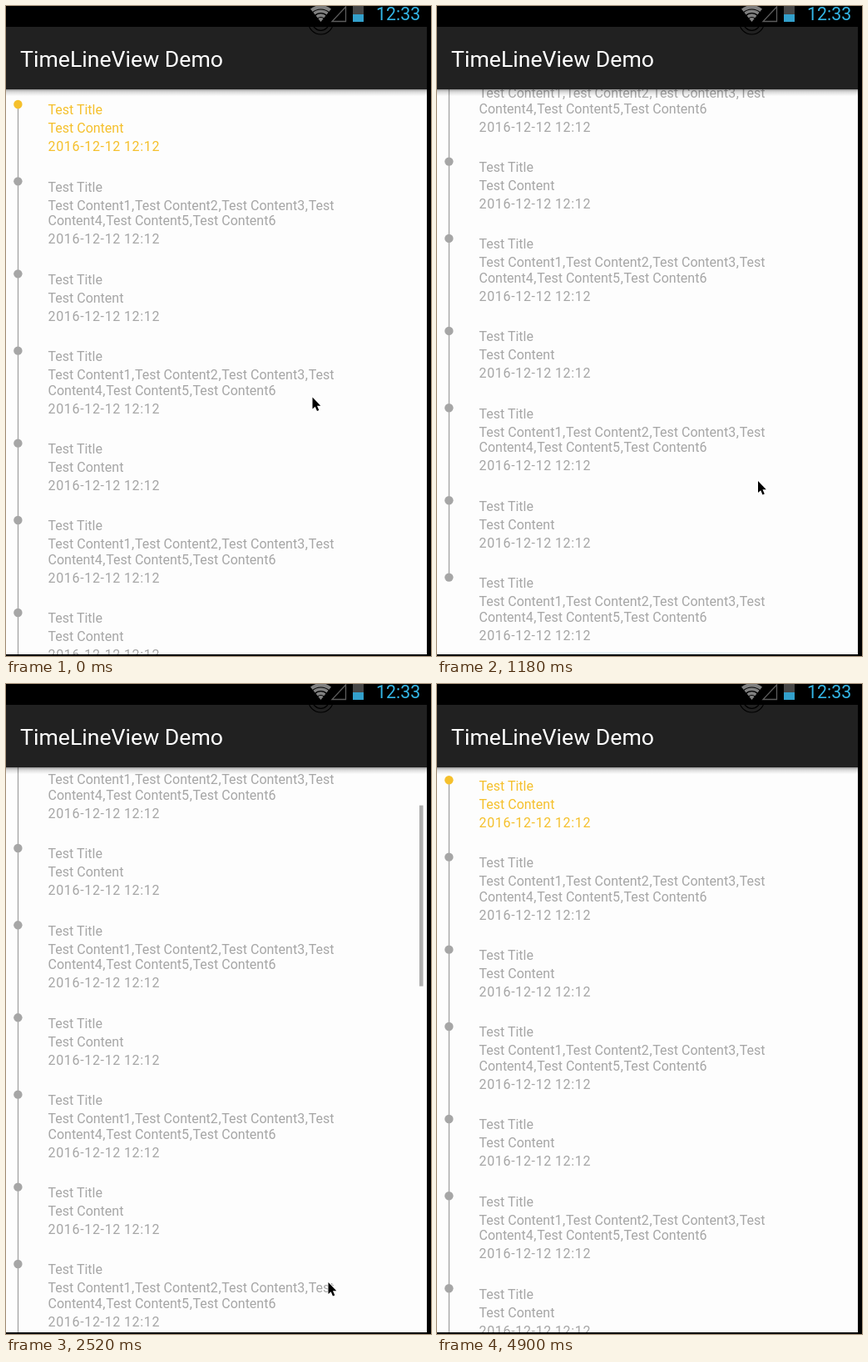
An HTML page that plays this animation: 511 by 780 pixels, repeating every 5350 ms.

```html
<!DOCTYPE html>
<html lang="en">
<head>
<meta charset="utf-8">
<title>TimeLineView Demo</title>
<style>
  html, body { margin: 0; width: 100%; height: 100%; overflow: hidden; background: #000; }
  svg { display: block; width: 511px; height: 780px; font-family: Roboto, "Noto Sans", sans-serif; }
  .item { font-size: 16px; fill: #a6a6a6; }
  .item.first { fill: #f5c02c; }
  .num { letter-spacing: .67px; }
</style>
</head>
<body>
<svg viewBox="0 0 511 780">
  <defs>
    <clipPath id="view"><rect y="99" width="506" height="679"/></clipPath>
    <linearGradient id="shade" x2="0" y2="1">
      <stop offset="0" stop-opacity=".4"/>
      <stop offset=".35" stop-opacity=".15"/>
      <stop offset="1" stop-opacity="0"/>
    </linearGradient>
    <radialGradient id="halo">
      <stop offset="0" stop-color="#33b5e5"/>
      <stop offset=".7" stop-color="#33b5e5" stop-opacity=".7"/>
      <stop offset=".96" stop-color="#33b5e5" stop-opacity=".4"/>
      <stop offset="1" stop-color="#33b5e5" stop-opacity="0"/>
    </radialGradient>
  </defs>

  <rect width="511" height="780"/>
  <rect y="99" width="506" height="679" fill="#fdfdfd"/>
  <g clip-path="url(#view)">
    <g id="list"></g>
    <rect id="bar" x="497" width="4.6" height="217" fill-opacity=".31"/>
    <ellipse id="topGlow" cx="255" cy="99" rx="224" fill="url(#halo)"/>
    <ellipse id="endGlow" cx="249" cy="778" rx="235" fill="url(#halo)"/>
    <ellipse id="endEdge" cx="250" cy="778" rx="160" ry="2.6" fill="#2ba6d6"/>
    <rect y="100" width="506" height="8" fill="url(#shade)"/>
  </g>

  <rect y="25" width="506" height="75" fill="#212121"/>
  <text x="17" y="73" font-size="26.67" fill="#fff">TimeLineView Demo</text>
  <text x="445" y="17" font-size="21.33" fill="#33b5e5">12:33</text>
  <path d="M378.5 19L366 3.5A20 20 0 0 1 391 3.5z" fill="#808080"/>
  <g fill="none" stroke="#000" stroke-width="1.2">
    <circle cx="378.5" cy="19" r="5.5"/>
    <circle cx="378.5" cy="19" r="10.3"/>
    <circle cx="378.5" cy="19" r="15"/>
  </g>
  <path d="M392 18.5H408.5V1z" fill="none" stroke="#5c5c5c" stroke-width="1.3"/>
  <rect x="417" width="13" height="10" fill="#474747"/>
  <rect x="417" y="10" width="13" height="9" fill="#33a0cc"/>

  <path id="cursor" d="M0 0V14L3.2 11.2L5.5 16.4L7.8 15.4L5.5 10.2H9.8z" stroke="#fff" stroke-width="1.6" paint-order="stroke"/>
</svg>

<script>
const LOOP = 5350, STEPS = 36, STEP = LOOP / STEPS;
const ITEMS = 20, SHORT = 92.33, PERIOD = 203.33, FIRST_DOT = 115.3;
const END = 1352, REST = 71.5;

const $ = id => document.getElementById(id);
const set = (id, attrs) => {
  for (const name in attrs) $(id).setAttribute(name, attrs[name]);
};
const ramp = (t, a, b) => Math.min(1, Math.max(0, (t - a) / (b - a)));
const smooth = u => u * u * (3 - 2 * u);

const dotY = i => FIRST_DOT + Math.floor(i / 2) * PERIOD + (i % 2) * SHORT;

function itemMarkup(i) {
  const lines = i % 2
    ? ["Test Content1,Test Content2,Test Content3,Test", "Content4,Test Content5,Test Content6"]
    : ["Test Content"];
  const row = (y, text) => `<text x="50.5" y="${y}">` +
    text.replace(/[\d,:-]+/g, '<tspan class="num">$&</tspan>') + "</text>";
  return `<g class="item${i ? "" : " first"}" transform="translate(0 ${dotY(i)})">` +
    `<circle cx="14.4" r="5.2"/>` + row(12.3, "Test Title") +
    lines.map((text, n) => row(34.3 + 18.7 * n, text)).join("") +
    row(37.6 + 18.7 * lines.length, "2016-12-12 12:12") + "</g>";
}

function buildList() {
  const rail = `<path d="M14.5 ${dotY(0)}V${dotY(ITEMS - 1)}" stroke="#a3a3a3" stroke-width="1.3"/>`;
  $("list").innerHTML = rail + Array.from({ length: ITEMS }, (_, i) => itemMarkup(i)).join("");
}

// Swipe to the end, fling back almost to the top, then pull past the top.
function scrollAt(t) {
  if (t < 1500) return -2.7 + (END + 2.7) * smooth(ramp(t, 60, 730));
  const fling = 1201 * ramp(t, 2900, 1783) ** 2.9;
  const early = t < 1783 ? END : REST + fling;
  return Math.min(END, early) - REST * ramp(t, 3420, 3700);
}

// Each move: start, end, x, y.
const MOVES = [
  [60, 440, 345, 118], [730, 1180, 386, 570], [1480, 1930, 387.5, 718],
  [2820, 3270, 379.5, 326], [3420, 3710, 385.5, 639], [3720, 4450, 420, 739], [4600, 4750, 470, 763]
];

function cursorAt(t) {
  let x = 368.5, y = 469.5;
  for (const [a, b, toX, toY] of MOVES) {
    const u = smooth(ramp(t, a, b));
    x += (toX - x) * u;
    y += (toY - y) * u;
  }
  return [x, y];
}

const shown = (t, on, off) => ramp(t, on, on + 140) * (1 - ramp(t, off, off + 300));
const barAt = t => Math.max(shown(t, 0, 880), shown(t, 1480, 3130), shown(t, 3420, 4000));
const glowAt = (t, start, peak, end) => ramp(t, start, peak) * (1 - ramp(t, peak, end)) ** 2;

function draw(now) {
  // The screen refreshes in even steps and holds in between.
  const t = Math.min(STEPS - 1, Math.floor((now % LOOP + 14) / STEP)) * STEP;
  const scroll = scrollAt(t);
  const top = glowAt(t, 3420, 3860, 4450), end = glowAt(t, 590, 800, 1330);
  set("list", { transform: `translate(0 ${-scroll})` });
  set("bar", { y: 105 + 452 * Math.max(0, scroll) / END, opacity: barAt(t) });
  set("topGlow", { ry: 112 * top, opacity: .34 * top });
  set("endGlow", { ry: 47 * end, opacity: .62 * end });
  set("endEdge", { opacity: 1.2 * end });
  set("cursor", {
    transform: `translate(${cursorAt(t)})`,
    visibility: t < 4800 ? "visible" : "hidden"
  });
}

buildList();
const start = performance.now();
function frame() {
  draw(performance.now() - start);
  requestAnimationFrame(frame);
}
frame();
</script>
</body>
</html>
```
